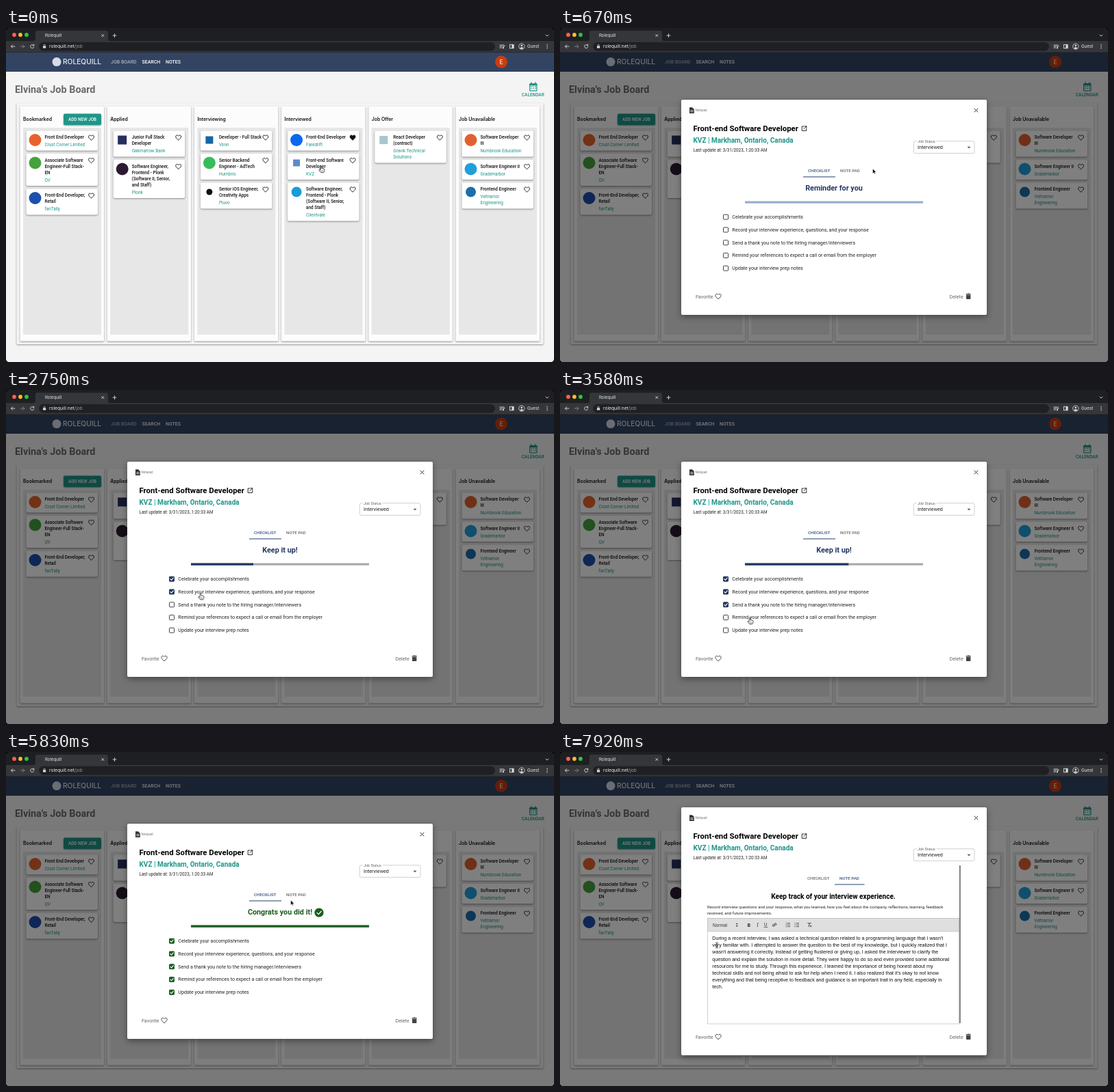
These frames come from a looping animation (800 px wide and 489 px high, 8 s). An HTML page:

```html
<!DOCTYPE html>
<html lang="en">
<head>
<meta charset="utf-8">
<title>Job board</title>
<style>
html, body { margin: 0; width: 100%; height: 100%; overflow: hidden; background: #000; }
svg { display: block; width: 100vw; height: 100vh; font-family: Roboto, sans-serif; }
.m { font-weight: 500; }
.b { font-weight: 600; }
.mid { text-anchor: middle; }
.ui { font-family: Inter, sans-serif; }
.head { font-family: Inter, sans-serif; font-weight: 600; }
.edit { font-family: "Liberation Sans", sans-serif; }
.shadow { filter: drop-shadow(0 1px 1.2px rgba(0,0,0,.4)); }
.lift { filter: drop-shadow(0 3px 5px rgba(0,0,0,.4)); }
.line { fill: none; stroke-linecap: round; stroke-linejoin: round; }
</style>
</head>
<body>
<svg id="stage" viewBox="0 0 800 489"></svg>
<script>
const TEAL = '#1f9688', NAVY = '#233860', GREEN = '#1b5e20', GREY = '#666', ACTIVE = '#35527f';
const LOOP = 8000, STEP = 1000 / 12;
const CLICKS = [1950, 2450, 3220, 3800, 4490];
const SWITCH = 6530, RIPPLE = 6400;

// Drawing helpers
const text = (x, y, size, str, fill = '#222', cls = '') =>
  `<text x="${x}" y="${y}" font-size="${size}" fill="${fill}" class="${cls}">${str}</text>`;
const lines = (x, y, pitch, size, list, fill, cls) =>
  list.map((str, i) => text(x, y + i * pitch, size, str, fill, cls)).join('');
const rect = (x, y, w, h, fill, extra = '') =>
  `<rect x="${x}" y="${y}" width="${w}" height="${h}" fill="${fill}" ${extra}/>`;
const circle = (x, y, r, fill, extra = '') =>
  `<circle cx="${x}" cy="${y}" r="${r}" fill="${fill}" ${extra}/>`;
const stroke = (d, color, width = 1, extra = '') =>
  `<path d="${d}" class="line" stroke="${color}" stroke-width="${width}" ${extra}/>`;
const shape = (d, fill, extra = '') => `<path d="${d}" fill="${fill}" ${extra}/>`;
const group = (id, body, extra = '') => `<g id="${id}" ${extra}>${body}</g>`;
const heart = (x, y, size, color, full) =>
  `<path transform="translate(${x - size / 2} ${y - size / 2}) scale(${size / 24})"
    d="M12 20.4C5.4 14.8 3 12.2 3 8.5 3 5.9 5 4 7.5 4 9.3 4 11 5 12 6.7 13 5 14.7 4 16.5 4 19 4 21 5.9 21 8.5 21 12.2 18.6 14.8 12 20.4Z"
    fill="${full ? color : 'none'}" stroke="${color}" stroke-width="2.1"/>`;

// Board data: title, company, logo colour, logo size, round logo, favourite
const COLUMNS = [
  ['Bookmarked',
    ['Front End Developer', 'Crust Corner Limited', '#e8622c', 18, 1],
    ['Associate Software|Engineer-Full Stack-|EN', 'QV', '#45a23c', 18, 1],
    ['Front-End Developer,|Retail', 'fanTally', '#1d4fae', 18, 1]],
  ['Applied',
    ['Junior Full Stack|Developer', 'Oakmarrow Bank', '#27305c', 13, 0],
    ['Software Engineer,|Frontend - Plonk|(Software II, Senior,|and Staff)', 'Plonk', '#2b1a30', 18, 1]],
  ['Interviewing',
    ['Developer - Full Stack', 'Vonn', '#1565a8', 11, 0],
    ['Senior Backend|Engineer - AdTech', 'Humbrio', '#35bd5c', 18, 1],
    ['Senior iOS Engineer,|Creativity Apps', 'Pluvo', '#111', 9, 1]],
  ['Interviewed',
    ['Front-End Developer', 'Faredrift', '#0a69ee', 18, 1, 1],
    ['Front-end Software|Developer', 'KVZ', '#5b8bc9', 10, 0],
    ['Software Engineer,|Frontend - Plonk|(Software II, Senior,|and Staff)', 'Clientvale', '#169cd8', 15, 1]],
  ['Job Offer',
    ['React Developer|(contract)', 'Gravik Technical|Solutions', '#a9c6cc', 12, 0]],
  ['Job Unavailable',
    ['Software Developer|III', 'Numbrook Education', '#e2602f', 18, 1],
    ['Software Engineer II', 'GradeHarbor', '#219fdc', 18, 1],
    ['Frontend Engineer', 'Veltramor|Engineering', '#1b6fa9', 15, 1]],
];

function column([name, ...cards], index) {
  const x = 20.5 + index * 127.2;
  let top = 150.5;
  let out = rect(x, 114.5, 122.5, 344, '#fcfcfc', 'rx="1.5" class="shadow"') +
    rect(x + 4.5, 146, 114, 303, '#e7e7e7') +
    text(x + 4.5, 135.5, 6.9, name, '#111', 'head');
  for (const [title, company, color, size, round, favorite] of cards) {
    const titles = title.split('|'), companies = company.split('|');
    const companyY = top + 13.5 + 9 * titles.length;
    const height = companyY + 9 * companies.length - 2.5 - top;
    out += rect(x + 9, top, 104.5, height, '#fff', 'rx="2" class="shadow"') +
      rect(x + 22 - size / 2, top + 13.5 - size / 2, size, size, color, `rx="${round ? size / 2 : 0}"`) +
      lines(x + 36, top + 11.5, 9, 6.4, titles, '#111', 'm') +
      lines(x + 36, companyY, 9, 6.4, companies, TEAL) +
      heart(x + 104, top + 10, 10.5, '#111', favorite);
    top += height + 4.5;
  }
  return out;
}

const browser = rect(0, 0, 800, 36, '#1e1f22') +
  ['#ff5f57', '#febc2e', '#28c840'].map((c, i) => circle(12 + 9 * i, 10, 2.9, c)).join('') +
  shape('M40 19Q43 19 43 16V7Q43 4 46 4H146Q149 4 149 7V16Q149 19 152 19Z', '#35363a') +
  rect(0, 19, 800, 16.5, '#35363a') +
  rect(48, 20.8, 666, 12.6, '#1f2023', 'rx="6.3"') +
  circle(50.5, 11, 2.3, '#27344a') +
  text(57, 13.4, 6.1, 'Rolequill', '#e8e8e8', 'ui') +
  stroke('M139.8 9.5l3 3m0-3l-3 3M156 11h5m-2.5-2.5v5M788 10l2 2 2-2', '#ddd', .9) +
  stroke('M13 27H7.5m2.3-2.3L7.5 27l2.3 2.3', '#ddd', .9) +
  stroke('M21.5 27H27m-2.3-2.3L27 27l-2.3 2.3', '#888', .9) +
  stroke('M40.5 25.5a2.6 2.6 0 1 0 .3 2.2M40.8 24v1.8H39', '#ddd', .9) +
  rect(54, 26.3, 4.2, 3.3, '#ddd', 'rx=".5"') + stroke('M55 26v-.8a1.1 1.1 0 0 1 2.2 0v.8', '#ddd', .7) +
  text(63, 29.3, 6.7, 'rolequill.net<tspan fill="#999">/job</tspan>', '#f2f2f2', 'ui') +
  stroke('M721 25h6m-6 2h4m-4 2h2.5M726.5 29.5v-3h1.6', '#ddd', .9) + circle(725.8, 29.3, 1, '#ddd') +
  rect(735.5, 24.3, 5.6, 5.4, 'none', 'stroke="#ddd" stroke-width=".9"') + rect(738.4, 24.3, 2.7, 5.4, '#ddd') +
  circle(752.8, 27, 4.2, 'none', 'stroke="#ddd" stroke-width=".8"') + circle(752.8, 25.8, 1.4, '#ddd') +
  shape('M750 29.5Q752.8 26.5 755.6 29.5Q752.8 32 750 29.5Z', '#ddd') +
  text(761, 29.3, 6.2, 'Guest', '#eee', 'ui') +
  [24.6, 27, 29.4].map(y => circle(790, y, .75, '#ddd')).join('');

const calendar = rect(764, 81, 11.5, 11.5, TEAL, 'rx="1.2"') + rect(765.2, 84.3, 9.1, 7, '#f4f4f4') +
  stroke('M766.8 79.8v1.5m6-1.5v1.5', TEAL, 1.4) +
  stroke('M766 86h7.6M766 88.6h7.6', TEAL, 1.4, 'stroke-dasharray="1.4 1.6" style="stroke-linecap:butt"');

const board = rect(0, 35, 800, 454, '#f4f4f4') + rect(0, 35.5, 800, 28.5, '#334462') +
  circle(74, 49.6, 6.5, '#d5dbe7') +
  text(83, 53.3, 10.2, 'ROLEQUILL', '#e6eaf2', 'ui m') +
  text(153, 52, 7, 'JOB BOARD', '#a9afbd', 'm') +
  text(198.5, 52, 7, 'SEARCH', '#fff', 'm') + text(233, 52, 7, 'NOTES', '#fff', 'm') +
  circle(723, 49.6, 9, '#c93c10') + text(723, 52.9, 9, 'E', '#fff', 'mid') +
  text(13, 94.5, 14.4, "Elvina's Job Board", '#6a6a6a', 'b') +
  calendar + text(769.3, 100, 6.5, 'CALENDAR', TEAL, 'mid m') +
  rect(15.5, 110, 769, 353, '#f4f4f4', 'rx="1.5" class="shadow"') +
  COLUMNS.map(column).join('') +
  rect(84, 125.5, 55, 16.5, TEAL, 'rx="2" class="shadow"') +
  text(111.5, 136, 6.3, 'ADD NEW JOB', '#fff', 'mid m');

const header = shape('M189 116.3h4l2.8 2.8v5.8h-6.8z', '#333') +
  stroke('M190.6 120.7h3.6m-3.6 2h3.6', '#fff', .8) +
  text(197.5, 122.2, 4.5, 'Notepad', '#777') +
  stroke('M605 118l5 5m0-5l-5 5', '#333', 1) +
  text(194.5, 151, 11.4, 'Front-end Software Developer', '#000', 'b') +
  stroke('M356 144h-2.8v6.4h6.4v-2.8M357.2 143.8h2.6v2.6M359.6 144l-3.8 3.8', '#111', .9) +
  text(194.5, 168, 10, 'KVZ | Markham, Ontario, Canada', TEAL, 'b') +
  text(194.5, 180.6, 6.3, 'Last update at: 3/31/2023, 1:20:33 AM') +
  rect(516.3, 165.8, 88.7, 17.6, 'none', 'rx="2" stroke="#bbb" stroke-width=".7"') +
  rect(520.5, 164, 29, 4, '#fff') + text(522, 167.6, 5.4, 'Job Status', GREY) +
  text(522, 177.3, 7.2, 'Interviewed') + shape('M594.5 173.7h5l-2.5 2.6z', '#555') +
  group('tabs', `<clipPath id="tabClip"><rect x="402" y="198" width="43.5" height="20.5"/></clipPath>` +
    `<g clip-path="url(#tabClip)">${circle(428, 208.5, 0, '#5d7596', 'id="ripple"')}</g>` +
    text(378.3, 210.5, 6.2, 'CHECKLIST', GREY, 'mid m').replace('<text', '<text id="tabList"') +
    text(423.5, 210.5, 6.2, 'NOTE PAD', GREY, 'mid m').replace('<text', '<text id="tabNote"') +
    rect(355, 217.4, 47, 1.1, ACTIVE, 'id="indicator"'));

const TASKS = ['Celebrate your accomplishments', 'Record your interview experience, questions, and your response',
  'Send a thank you note to the hiring manager/interviewers',
  'Remind your references to expect a call or email from the employer', 'Update your interview prep notes'];

const checklist = text(400, 238, 10.8, '', NAVY, 'mid b').replace('<text', '<text id="cheer"') +
  group('done', circle(457, 235.2, 6.6, GREEN) + stroke('M454 235.4l2.2 2.2 4-4.4', '#fff', 1.3)) +
  rect(270, 253.5, 260, 3.2, '#aaa', 'id="track"') + rect(270, 253.5, 0, 3.2, NAVY, 'id="bar"') +
  TASKS.map((task, i) => {
    const y = 276.7 + 18.78 * i;
    return rect(238.5, y - 3.5, 7, 7, 'none', `rx=".8" stroke-width="1" id="box${i}"`) +
      stroke(`M239.9 ${y}l1.6 1.7 2.9-3.4`, '#fff', 1.1) + text(251.3, y + 2.4, 7.1, task);
  }).join('');

const NOTE = [
  "During a recent interview, I was asked a technical question related to a programming language that I wasn't",
  'very familiar with. I attempted to answer the question to the best of my knowledge, but I quickly realized that I',
  "wasn't answering it correctly. Instead of getting flustered or giving up, I asked the interviewer to clarify the",
  'question and explain the solution in more detail. They were happy to do so and even provided some additional',
  'resources for me to study. Through this experience, I learned the importance of being honest about my',
  "technical skills and not being afraid to ask for help when I need it. I also realized that it's okay to not know",
  'everything and that being receptive to feedback and guidance is an important trait in any field, especially in',
  'tech.'];

const notes = text(399, 215, 10.05, 'Keep track of your interview experience.', '#000', 'mid b') +
  lines(215, 229.3, 9, 6.05, [
    'Record interview questions and your response, what you learned, how you feel about the company, reflections, learning, feedback',
    'received, and future improvements.']) +
  rect(215.4, 243.4, 367.4, 154.6, '#fff', 'stroke="#bbb" stroke-width=".7"') +
  rect(215.4, 243.4, 367.4, 19, '#dfdfdf', 'stroke="#bbb" stroke-width=".7"') +
  rect(582.7, 166, 2.3, 231, '#8c8c8c') +
  text(223, 255.6, 6.5, 'Normal', '#333', 'edit') +
  shape('M256.6 252.3l1.6-2 1.6 2zM256.6 253.9l1.6 2 1.6-2z', '#333') +
  text(273.5, 255.7, 7.2, '<tspan font-weight="700">B</tspan>', '#333') +
  text(287.3, 255.7, 7.2, '<tspan font-style="italic" font-family="Liberation Serif, serif">I</tspan>', '#333') +
  text(298, 255.2, 6.8, 'U', '#333') + stroke('M298 256.6h5', '#333', .7) +
  stroke('M312.6 252.2l1-1a1.3 1.3 0 0 1 1.9 1.9l-1 1M313.6 253.8l-1 1a1.3 1.3 0 0 1-1.9-1.9l1-1M312 254.2l2.2-2.2', '#333', .9) +
  stroke('M332.2 250.6h3.4m-3.4 2.5h3.4m-3.4 2.5h3.4M345.2 250.6h3.4m-3.4 2.5h3.4m-3.4 2.5h3.4', '#333', .8) +
  [250.6, 253.1, 255.6].map((y, i) => text(329.4, y + 1, 2.8, i + 1, '#333') + circle(343, y, .6, '#333')).join('') +
  stroke('M361.6 250.6h4.8m-2.2 0l-1.2 5M364.8 253.6l2.2 2.2m0-2.2l-2.2 2.2', '#333', .8) +
  lines(222.3, 275, 10.2, 7.12, NOTE, '#111', 'edit');

const footer = text(198, 395.5, 7.2, 'Favorite', GREY) + heart(231, 393, 11, '#444') +
  text(568.5, 395.5, 7.2, 'Delete', GREY) +
  shape('M593 390.8h6.4v5.4q0 .9-.9.9h-4.6q-.9 0-.9-.9zM592.4 389.2h2l.7-.7h2.2l.7.7h2v1h-7.6z', '#444');

const cursors =
  group('hand', shape('M-1.6-4.6c.9-.2 1.3.4 1.3 1v2.1l3.3.8c.8.2 1.1.7 1 1.5l-.4 2.3-.8 1.6h-4l-2.7-3.2c-.6-.9.4-1.5 1.1-.9l.9.8v-5.1c0-.5.1-.8.3-.9z',
    '#fff', 'stroke="#222" stroke-width=".8"') + stroke('M-.2 1.6v1.6M1.3 1.6v1.6', '#222', .5)) +
  group('arrow', shape('M-.5-4v7.2l1.7-1.6 1.1 2.5 1.1-.5-1.1-2.4h2.2z', '#000', 'stroke="#fff" stroke-width=".5"')) +
  group('beam', stroke('M-1.6-4Q0-4 0-3V3Q0 4-1.6 4M1.6-4Q0-4 0-3M0 3Q0 4 1.6 4M-1 1.2h2', '#222', .8));

const stage = document.getElementById('stage');
stage.innerHTML = `<clipPath id="window"><rect width="800" height="489" rx="4.5"/></clipPath>
  <g clip-path="url(#window)">` + board + rect(0, 35.5, 800, 453.5, '#000', 'id="backdrop"') + browser +
  group('dialog', rect(177, 105, 446, 315, '#fff', 'rx="2" class="lift" id="paper"') +
    group('header', header) + group('checklist', checklist) + group('notes', notes) + group('footer', footer)) +
  group('cursor', cursors) + '</g>';

// Animation
const el = id => document.getElementById(id);
const set = (id, attrs) => { for (const name in attrs) el(id).setAttribute(name, attrs[name]); };
const show = (id, on) => set(id, { display: on ? 'inline' : 'none' });
const ramp = (t, start, length) => Math.min(1, Math.max(0, (t - start) / length));
const smooth = u => u * u * (3 - 2 * u);

// Pointer stops: time, x, y
const PATH = [[0, 461, 207], [170, 461, 207], [400, 457, 210], [750, 457, 210], [1600, 289, 279], [2000, 289, 279],
  [2380, 286, 297], [2600, 286, 297], [3050, 282, 317], [3250, 282, 318], [3570, 278, 338], [3820, 278, 338],
  [4150, 283, 356], [5050, 283, 356], [6000, 428, 209], [6660, 428, 209], [7350, 250, 298], [7900, 229, 283]];
const POINTERS = [[0, 'hand'], [300, 'arrow'], [1400, 'hand'], [5600, 'arrow'], [5900, 'hand'], [SWITCH, 'beam']];

function pointerAt(t) {
  const i = PATH.findLastIndex(stop => stop[0] <= t);
  const [t0, x0, y0] = PATH[i], [t1, x1, y1] = PATH[i + 1] || [LOOP, x0, y0];
  const u = smooth(ramp(t, t0, t1 - t0));
  return [x0 + (x1 - x0) * u, y0 + (y1 - y0) * u];
}

function render(t) {
  const noteView = t >= SWITCH;
  const count = CLICKS.filter(c => t >= c).length;
  const complete = count === TASKS.length;
  const accent = complete ? GREEN : NAVY;

  set('backdrop', { opacity: .5 * smooth(ramp(t, 195, 300)) });
  set('dialog', { opacity: ramp(t, 170, 220) });
  set('paper', noteView ? { y: 81, height: 363 } : { y: 105, height: 315 });
  set('header', { transform: `translate(0 ${noteView ? -24 : 0})` });
  set('footer', { transform: `translate(0 ${noteView ? 24 : 0})` });
  set('tabs', { transform: `translate(${noteView ? -1 : 0} 0)` });
  show('checklist', !noteView);
  show('notes', noteView);

  el('cheer').textContent = complete ? 'Congrats you did it!' : count ? 'Keep it up!' : 'Reminder for you';
  set('cheer', { fill: accent });
  show('done', complete);
  const progress = CLICKS.reduce((sum, c) => sum + ramp(t, c, 400), 0) / CLICKS.length;
  set('track', { fill: count ? '#aaa' : '#98abd2' });
  set('bar', { width: 260 * progress, fill: accent });
  TASKS.forEach((_, i) => {
    const checked = i < count;
    set('box' + i, checked ? { fill: accent, stroke: accent } : { fill: '#fff', stroke: '#444' });
    el('box' + i).nextElementSibling.setAttribute('display', checked ? 'inline' : 'none');
  });

  const slide = smooth(ramp(t, SWITCH, 300));
  set('indicator', { x: 355 + 47 * slide, width: 47 - 3.5 * slide });
  set('tabList', { fill: noteView ? GREY : ACTIVE });
  set('tabNote', { fill: noteView ? ACTIVE : GREY });
  set('ripple', { r: 28 * ramp(t, RIPPLE, 340), opacity: .42 * (1 - ramp(t, 6620, 450)) });

  const kind = POINTERS.findLast(p => p[0] <= t)[1];
  for (const id of ['hand', 'arrow', 'beam']) show(id, id === kind);
  set('cursor', { transform: `translate(${pointerAt(t)})` });
}

function frame() {
  const t = performance.now() % LOOP;
  render(Math.floor((t + 5) / STEP) * STEP % LOOP);
  requestAnimationFrame(frame);
}
frame();
</script>
</body>
</html>
```
